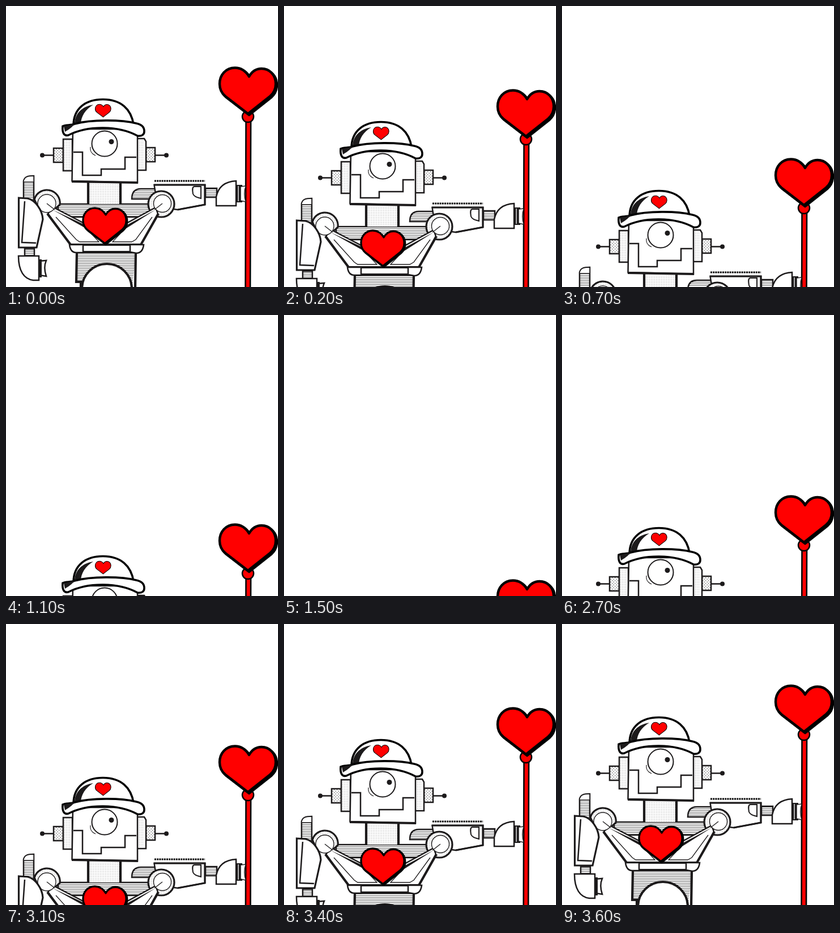
An HTML page that plays this animation: 480x498 px, repeating every 3.7 s.

```html
<!DOCTYPE html>
<html lang="en">
<head>
<meta charset="utf-8">
<title>Robot with a heart balloon</title>
<style>
  html, body { margin: 0; width: 100%; height: 100%; overflow: hidden; background: #fff; }
  svg { display: block; width: 480px; height: 498px; }
  .ink { fill: #fff; stroke: #1c1a1b; stroke-width: 2.5; }
  .thin { stroke-width: 1.3; }
  .mid { stroke-width: 3.2; }
  .bold { stroke-width: 4.2; }
  .open { fill: none; }
  .black { fill: #1c1a1b; stroke: none; }
  .cap { stroke: #000; stroke-width: 3.6; }
  .rows { fill: url(#rows); }
  .dots { fill: url(#dots); }
  .grain { fill: url(#grain); }
</style>
</head>
<body>
<svg viewBox="0 0 480 498">
  <defs>
    <pattern id="rows" width="3" height="3" patternUnits="userSpaceOnUse">
      <rect width="3" height="3" fill="#fff"/><rect width="3" height="1" fill="#666"/>
    </pattern>
    <pattern id="dots" width="5" height="5" patternUnits="userSpaceOnUse">
      <rect width="5" height="5" fill="#fff"/>
      <circle cx="1.200" cy="1.200" r=".7" fill="#333"/><circle cx="3.700" cy="3.700" r=".7" fill="#333"/>
    </pattern>
    <pattern id="grain" width="3" height="3" patternUnits="userSpaceOnUse">
      <rect width="3" height="3" fill="#fff"/><circle cx="1.500" cy="1.500" r=".5" fill="#777"/>
    </pattern>
    <path id="shape" d="M0 0C-6-10-15-15.5-25-15.5C-41-15.5-52-3-52 13C-52 23-48 30-42 35L-2 66L37 35C44 29 47 22 47 13C47-3 36-14 22-14C13-14 5-9 0 0Z"/>
    <g id="heart" stroke="#000" stroke-width="4.400" stroke-linejoin="round">
      <use href="#shape" x="2" y="2"/>
      <use href="#shape" fill="#f00"/>
    </g>
  </defs>

  <g id="robot">
    <!-- balloon -->
    <path d="M423.500 204L422.500 500H431L432 204Z" fill="#f00" stroke="#000" stroke-width="2.600"/>
    <circle cx="427" cy="196" r="10" fill="#f00" stroke="#000" stroke-width="2.500"/>
    <use href="#heart" transform="translate(429 125)"/>

    <!-- stretched arm -->
    <path class="ink rows" d="M222 342C222 329 228 324 238 324H264V342Z"/>
    <path d="M262 310H351" stroke="#000" stroke-width="3" stroke-dasharray="3 1.200"/>
    <path class="ink" d="M261.500 317H351V352L303 361L282 358L264 333Z"/>
    <path class="ink open mid" d="M261 317H351V352L303 361"/>
    <path class="ink" style="stroke-width:2" d="M344 320H332C328 321 329 327 330 333C332 338 337 339 344 341Z"/>
    <path class="ink rows" d="M352 323H372V339H352Z"/>
    <path class="ink" d="M406 310V354H371V338C375 319 387 311 406 310Z"/>
    <path class="black" d="M406 317H417V348H406Z"/>
    <path class="ink thin" d="M414 320L423 319C420 328 420 338 423 347L414 345Z"/>
    <path class="ink thin open" style="stroke:#fff" d="M410 319V346"/>

    <!-- belly -->
    <path class="ink rows" style="stroke:none" d="M124 436H230L222 500H133V489H126Z"/>
    <path class="ink open bold" d="M125 436L124 489H132V500M229 436L228 500"/>
    <circle class="ink bold" cx="178" cy="501" r="44"/>

    <!-- chest and shoulder gears -->
    <path class="ink rows" d="M92 351H256V374H92Z"/>
    <circle class="ink grain mid" cx="274" cy="351" r="23"/>
    <path class="ink grain mid" d="M50 343A23 23 0 0 1 95 352L84 362H60Z"/>
    <path class="ink" d="M74 368L84 357L176 405L264 357L268 368L238 423H114Z"/>
    <path class="ink open bold" d="M73 368L114 423M269 368L238 423M114 423H238"/>
    <path class="black" d="M82 361L148 392V398ZM264 361L206 392V398Z"/>
    <path class="ink thin open" d="M88 374L124 414L130 418H164L150 403M258 374L229 414L222 418H188L202 403"/>
    <path class="ink open bold" d="M130 436H224"/>
    <path class="ink" d="M112 423H136V437H124C116 437 113 431 112 423Z"/>
    <path class="ink" d="M219 423H243C242 431 239 438 230 438L219 436Z"/>
    <use href="#heart" transform="translate(176 370) scale(.77)"/>
    <circle class="ink thin" cx="72" cy="350" r="16"/>
    <circle class="ink thin" cx="276" cy="350" r="15.500"/>
    <path class="ink thin open" d="M72 350L86 361M276 350L262 361"/>

    <!-- neck -->
    <path class="grain" d="M145 310H202V351H145Z"/>
    <path class="ink bold open" d="M145 312V351M202 312V351"/>

    <!-- ears -->
    <path class="ink open" d="M66 264.500H84M264 264.500H281"/>
    <circle class="black" cx="64" cy="264.500" r="4"/>
    <circle class="black" cx="283" cy="264.500" r="4"/>
    <path class="ink dots" d="M84 252H101V277H84ZM247 251H263V276H247Z"/>
    <path class="ink" d="M101 236H117V292H101ZM231 235H244L247 240V291H231Z"/>
    <path class="grain" d="M103 238H115V290H103ZM234 238H242V289H234Z"/>

    <!-- head -->
    <path class="ink" d="M118 218L116.500 310L232 313V218Z"/>
    <path class="ink open bold" d="M116 311L233 313"/>
    <path class="ink open" d="M119 259H135V300H168V289H210V268H230"/>
    <path class="ink thin open" d="M149 250C148 258 151 262 158 265"/>
    <circle class="ink" style="stroke-width:2" cx="174" cy="244" r="22.500"/>
    <circle class="black" cx="186" cy="240.500" r="4.500"/>

    <!-- cap -->
    <path class="ink cap" d="M119 212C119 181 141 165.500 171 165.500C203 165.500 221 183 225 210Z"/>
    <path class="black" d="M121 210C121 191 134 178 154 175C140 183 132 196 132 210Z"/>
    <path class="ink cap" d="M100 213C106 210 114 212 121 209C150 201 203 201 230 208C240 210 244 215 244 222C244 228 240 231 232 230C199 212 145 211 110 229C102 231 99 224 100 213Z"/>
    <path class="black" d="M102 213L122 209C117 213 116 216 104 223Z"/>
    <use href="#shape" transform="translate(172 178.500) scale(.28)" fill="#f00" stroke="#000" stroke-width="3.600"/>

    <!-- hanging arm -->
    <path class="ink rows" d="M31 350V310C33 303 38 301 49 301V355H31Z"/>
    <path class="ink" style="stroke-width:1.500" d="M31 312V310C33 303 38 301 49 301V312Z"/>
    <path class="ink mid" d="M22.500 340L38 341C52 344 64 362 65 378L54 428H22.500Z"/>
    <path class="ink open" d="M33 346L28 419L53 420"/>
    <path class="ink rows" d="M33 430H50V443H33Z"/>
    <path class="ink" d="M22 443H58V486H48C32 484 22 470 22 443Z"/>
    <path class="ink" d="M59 452L71 451C67 460 68 470 71 479L59 477Z"/>
    <path class="black" d="M57 449H63V481H57Z"/>
  </g>
</svg>
<script>
  const robot = document.getElementById('robot');
  const LOOP = 3700, STEP = 100;
  // downward shift at each step; the way up mirrors the way down
  const drop = [0, 20, 40, 62, 84, 107, 132, 162, 187, 212, 237, 262, 287, 311, 336, 361, 379, 388, 394];
  const last = drop.length - 1;

  function draw() {
    const step = Math.floor(performance.now() % LOOP / STEP);
    const y = drop[last - Math.abs(last - step)];
    robot.setAttribute('transform', `translate(0 ${y})`);
    requestAnimationFrame(draw);
  }
  draw();
</script>
</body>
</html>
```
